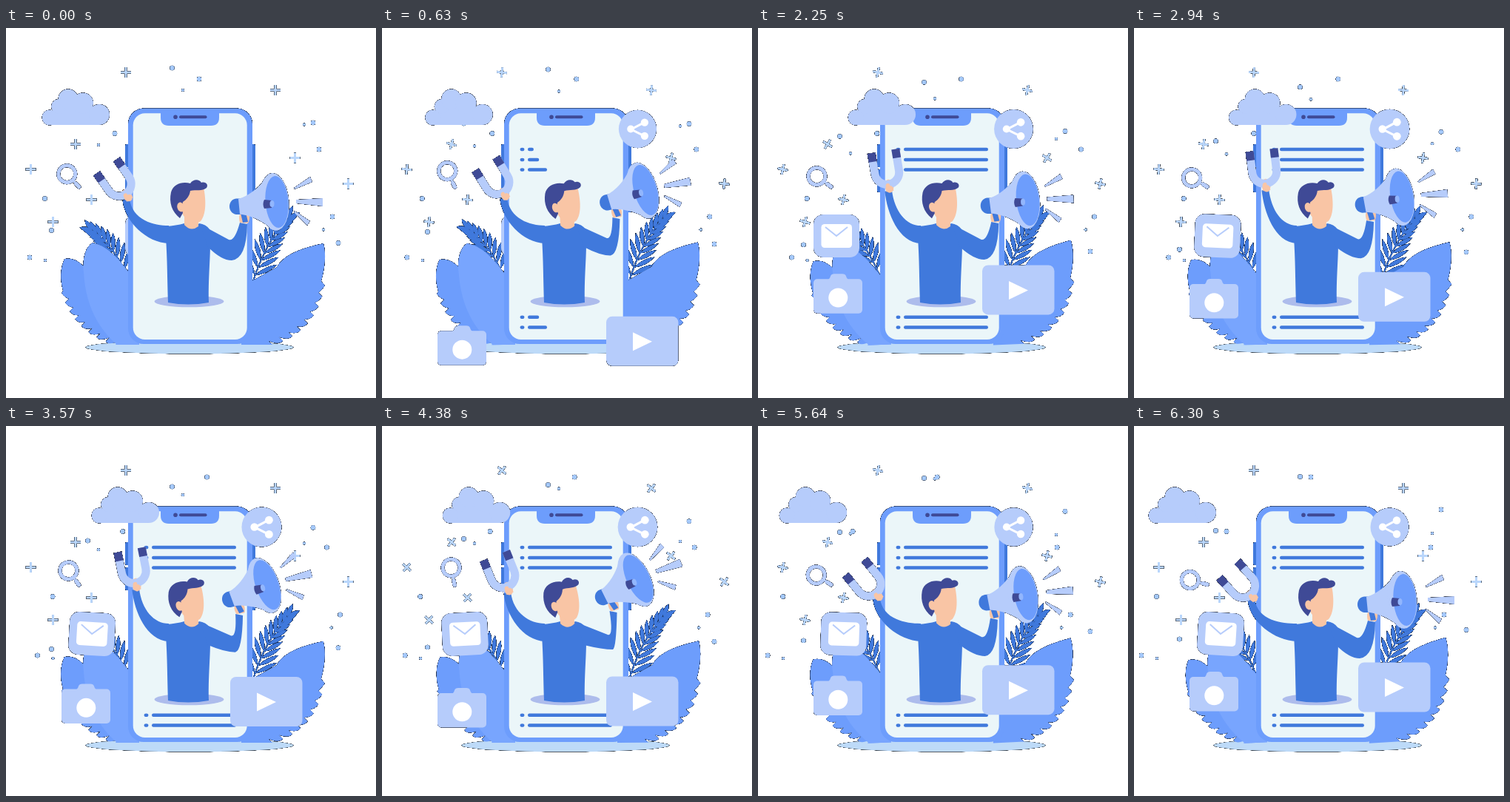
Write an HTML page that moves like this. It is 500 px wide and 500 px high and loops after 6330 ms.

```html
<!DOCTYPE html>
<html lang="en">
<head>
<meta charset="utf-8">
<title>Mobile marketing</title>
<style>
html, body { margin: 0; width: 100%; height: 100%; overflow: hidden; background: #fff; }
svg { display: block; width: 100vw; height: 100vh; }
.light { fill: #b6ccfb; }
.mid { fill: #6d9dfc; }
.soft { fill: #78a5fe; }
.blue { fill: #4079dc; }
.navy { fill: #3f4a96; }
.skin { fill: #f9c5a5; }
.white { fill: #fff; }
.spark { fill: #a4c8fa; }
.line { fill: none; stroke: #b6ccfb; }
.plus { fill: none; stroke: #b9d6fb; stroke-width: 3; }
</style>
</head>
<body>
<svg viewBox="0 0 500 500">
  <!-- Thin dark rim where soft edges meet the empty background -->
  <filter id="rim" filterUnits="userSpaceOnUse" x="0" y="0" width="500" height="500" color-interpolation-filters="sRGB">
    <feComponentTransfer in="SourceAlpha" result="solid"><feFuncA type="linear" slope="8" intercept="-1.2"/></feComponentTransfer>
    <feMerge><feMergeNode in="solid"/><feMergeNode in="SourceGraphic"/></feMerge>
  </filter>
  <g filter="url(#rim)">
    <ellipse cx="248" cy="431.5" rx="140.5" ry="8.8" fill="#bddaf8"/>
    <g id="fernL" class="blue"></g>
    <g id="fernR" class="blue"></g>
    <g id="leafL">
      <path id="edgeL" class="mid"/>
      <path class="soft" d="M180 428V350C158 318 142 296 117 290C107 296 103 312 105 330C107 365 118 400 150 428Z"/>
    </g>
    <g id="leafR"><path id="edgeR" class="mid"/></g>
    <g id="dots" class="spark"></g>
    <g id="pluses"></g>
    <g id="lens">
      <circle class="line" cy="-23" r="11.5" stroke-width="5"/>
      <path class="line" d="M0 -10V-5" stroke-width="3"/>
      <path class="line" d="M0 -5V1" stroke-width="5.5" stroke-linecap="round"/>
    </g>
    <g id="camera">
      <rect class="light" x="75" y="339" width="66" height="46.5" rx="5"/>
      <path class="light" d="M93 341Q97 339 98 335Q99 332 103 332H114Q118 332 119 335Q120 339 124 341Z"/>
      <circle class="white" cx="108.3" cy="364.3" r="13"/>
    </g>
    <g id="mail">
      <rect class="light" x="-31" y="-29" width="62" height="58" rx="13"/>
      <rect class="white" x="-20.5" y="-16" width="41.5" height="32" rx="4.5"/>
      <path class="line" d="M-15 -12L0 0L15 -12" stroke-width="2"/>
    </g>

    <rect class="blue" x="161" y="157" width="6" height="31" rx="2"/>
    <rect class="blue" x="161" y="191" width="6" height="31" rx="2"/>
    <rect class="blue" x="330" y="157" width="7" height="92" rx="2"/>
    <rect class="mid" x="165" y="108.6" width="168" height="318.4" rx="21"/>
    <rect x="171.7" y="115.3" width="154" height="305.7" rx="16" fill="#ebf6f9"/>
    <path class="mid" d="M209 110H288V121Q288 132 277 132H220Q209 132 209 121Z"/>
    <circle class="navy" cx="229" cy="120.3" r="2.8"/>
    <rect class="navy" x="234" y="118.3" width="37.5" height="4" rx="2"/>
    <g id="lines" class="blue"></g>

    <ellipse cx="247.5" cy="369.5" rx="47" ry="7.8" fill="#adbcec"/>
    <path class="blue" d="M216 268Q230 267 241 264Q251 276 261 264Q270 265 275 272C278 300 273 330 274 371Q246 376 219 371C218 345 218 310 216 284Z"/>
    <path id="armL" class="blue"/>
    <path id="armR" class="blue"/>
    <g id="head">
      <path class="skin" d="M241 248V266Q250 276 260 268V250Z"/>
      <path class="skin" d="M238 233C246 230 248 222 249 217Q261 221 267 215C271 235 270 253 263 261C255 267 242 260 238 250Z"/>
      <path class="navy" d="M235 257C224 248 220 236 223 222C226 211 238 207 249 210C253 204 261 204 264 209C270 207 274 212 271 216C265 221 257 218 249 220C248 227 244 232 239 235L237 243L239 250Z"/>
      <ellipse class="skin" cx="236" cy="242" rx="4.6" ry="6.5" transform="rotate(-15 236 242)"/>
    </g>
    <g id="magnet">
      <ellipse class="skin" cx="0" cy="-3" rx="6" ry="9"/>
      <path class="line" d="M-16.5 -51V-22A16.5 16.5 0 0 0 16.5 -22V-51" stroke-width="11"/>
      <path class="navy" d="M-22 -51H-11V-39H-22ZM11 -51H22V-39H11Z"/>
      <path class="skin" d="M-5 4Q-6 -7 -2 -7T1 -3Q5 -4 5 4Z"/>
    </g>
    <g id="horn">
      <path class="skin" d="M316 263C314 256 315 250 320 249L328 250C330 255 329 260 327 264Z"/>
      <path class="blue" d="M317 250L324 249L327 262L320 263Z"/>
      <path class="blue" d="M317 230.500H311C299 232 299 250 311 252H317Z"/>
      <path class="light" d="M314 231Q334 225 350 204L361 273Q338 254 316 251.500Z"/>
      <ellipse class="light" cx="362.500" cy="235" rx="20" ry="39" transform="rotate(-4.500 362 235)"/>
      <ellipse class="mid" cx="366" cy="235" rx="15.500" ry="35" transform="rotate(-4.500 366 235)"/>
      <path class="navy" d="M349 232L359 233V243L349 244Q346 238 349 232Z"/>
      <ellipse cx="359.500" cy="237.500" rx="3" ry="4.600" fill="#92b6fd"/>
      <g id="rays" class="light">
        <path d="M389 216L411 201L414 208L390 218Z"/>
        <path d="M392 232L428 230V241L392 237Z"/>
        <path d="M390 247L411 261L407 267L389 249Z"/>
      </g>
    </g>

    <g id="cloud" class="light">
      <path d="M59 115H126V131H59ZM70 100H116V131H70Z"/>
      <circle cx="59" cy="121" r="10.500"/><circle cx="71" cy="106" r="10"/>
      <circle cx="84" cy="96" r="13.500"/><circle cx="104" cy="101.500" r="14"/>
      <circle cx="126" cy="117" r="14"/>
    </g>
    <g id="share">
      <circle class="light" r="26"/>
      <path d="M9 -9L-9 0.500L9 9.500" fill="none" stroke="#fff" stroke-width="3"/>
      <g class="white"><circle cx="-9.500" r="5"/><circle cx="9.500" cy="-9" r="5.200"/><circle cx="9.500" cy="9.500" r="5.200"/></g>
    </g>
    <g id="video">
      <rect class="light" x="303" y="319.500" width="97.500" height="67" rx="8"/>
      <path class="white" d="M339 341V366L365 353.500Z"/>
    </g>
  </g>
</svg>
<script>
const LOOP = 6330, STEP = 30, END = 6300;
const $ = id => document.getElementById(id);

function add(parent, tag, attrs) {
  const el = document.createElementNS('http://www.w3.org/2000/svg', tag);
  for (const k in attrs) el.setAttribute(k, attrs[k]);
  return parent.appendChild(el);
}
const place = (el, value) => el.setAttribute('transform', value);
const part = (t, start, length) => Math.min(1, Math.max(0, (t - start) / length));
const easeOut = p => 1 - (1 - p) ** 3;
const easeInOut = p => p < .5 ? 4 * p ** 3 : 1 - 4 * (1 - p) ** 3;

// Sine-eased moves between turning points [time, value]
function tween(t, ...keys) {
  let value = keys[0][1];
  for (let i = 1; i < keys.length; i++) {
    const [t0, a] = keys[i - 1], [t1, b] = keys[i];
    value += (b - a) * (1 - Math.cos(Math.PI * part(t, t0, t1 - t0))) / 2;
  }
  return value;
}
// The slow swing shared by cloud, magnet and dots
const swing = (t, start, peak, end) => tween(t, [0, start], [2780, peak], [END, end]);

// Each group of dots drifts its own way
const sideways = t => [swing(t, 0, 15, -22), 0];
const upDown = t => [0, swing(t, 0, 12.5, -15)];
const dip = t => [0, tween(t, [0, 0], [3600, 28], [END, 14.5])];
const BIG = 3.2, SMALL = 2.1;
const dots = [
  [sideways, BIG, [261, 69], [423, 164], [441, 255], [147, 142.5], [52.5, 230.5], [32, 310]],
  [sideways, SMALL, [429, 272.5], [53, 314]],
  [upDown, BIG, [415, 128], [449, 290.5]],
  [upDown, SMALL, [239, 84], [125, 158]],
  [dip, BIG, [224.5, 54], [110.5, 127], [61.5, 273.5]],
  [dip, SMALL, [403, 130.5]]
].map(([move, r, ...points]) => {
  const el = add($('dots'), 'g');
  for (const [cx, cy] of points) add(el, 'circle', { cx, cy, r });
  return { el, move };
});

// Pluses: x, y, size of the first turn
const pluses = [
  [162, 60, 17], [364, 84, 17], [94, 157, 45], [33.5, 191, 17],
  [390.5, 175.5, 45], [462.5, 210.5, 17], [115.5, 232, 17], [63.5, 262, 22]
].map(([x, y, turn]) => ({ x, y, turn, el: add($('pluses'), 'path', { class: 'plus', d: 'M-7 0H7M0 -7V7' }) }));

// Text lines grow one after another
const lines = [191.5, 178, 164, 404.5, 390.7].map((y, i) => ({
  y, delay: 110 + 85 * (i % 3),
  bullet: add($('lines'), 'ellipse', { rx: 2.9, ry: 2.3 }),
  bar: add($('lines'), 'rect', { x: 197, y: y - 2.2, height: 4.4, rx: 2.2 })
}));

const along = (u, a, b, c) => (1 - u) ** 2 * a + 2 * u * (1 - u) * b + u * u * c;

// Saw-toothed edge along a curve; inward is the x side of the leaf body
function teeth([x0, y0], [cx, cy], [x1, y1], inward, count) {
  let d = '';
  for (let i = 0; i < count; i++) {
    const x = along(i / count, x0, cx, x1), y = along(i / count, y0, cy, y1);
    const nx = along((i + 1) / count, x0, cx, x1), ny = along((i + 1) / count, y0, cy, y1);
    d += `L${x} ${y}Q${x + 4 * inward} ${y + 6} ${nx + 5 * inward} ${ny - 5}`;
  }
  return d + `L${x1} ${y1}`;
}
$('edgeL').setAttribute('d', 'M180 428V345L104 321C97 314 88 310 79 312C73 325 73 340 77 355'
  + teeth([75, 358], [92, 412], [148, 428], 1, 8) + 'Z');
$('edgeR').setAttribute('d', 'M318 428V350L366 323C376 305 402 297 429 291C433 305 431 325 426 342'
  + teeth([431, 348], [420, 410], [360, 428], -1, 8) + 'Z');

// Fern with leaflets along a curved stem
function fern(g, [x0, y0], [cx, cy], [x1, y1], count, size) {
  add(g, 'path', { d: `M${x0} ${y0}Q${cx} ${cy} ${x1} ${y1}`, fill: 'none', stroke: '#4079dc', 'stroke-width': 1.8 });
  for (let i = 0; i <= count; i++) {
    const u = i / count;
    const angle = Math.atan2((1 - u) * (cy - y0) + u * (y1 - cy), (1 - u) * (cx - x0) + u * (x1 - cx)) * 180 / Math.PI;
    const l = size * (1 - .45 * u);
    for (const side of [-1, 1])
      add(g, 'path', {
        d: `M0 0Q${l * .5} -6 ${l} 0Q${l * .5} 6 0 0`,
        transform: `translate(${along(u, x0, cx, x1)} ${along(u, y0, cy, y1)}) rotate(${angle + side * (48 - 28 * u)})`
      });
  }
}
fern($('fernL'), [168, 345], [148, 295], [117, 274], 10, 33);
fern($('fernR'), [333, 345], [350, 290], [380, 258], 10, 35);

function draw(t) {
  for (const { el, move } of dots) place(el, `translate(${move(t)})`);
  for (const p of pluses) {
    const angle = tween(t, [0, 0], [1600, p.turn], [3500, 0], [4500, 42], [END, 0]);
    place(p.el, `translate(${p.x} ${p.y}) rotate(${angle})`);
  }
  for (const l of lines) {
    place(l.bullet, `translate(189.500 ${l.y}) scale(${easeOut(part(t, l.delay - 110, 400))})`);
    l.bar.setAttribute('width', 114 * easeInOut(part(t, l.delay, 1350)));
  }

  place($('cloud'), `translate(${swing(t, 0, 80, -29)} 0)`);
  place($('lens'), `translate(98 214) rotate(${tween(t, [0, -43], [1200, -10], [2650, -63], [4450, -11], [END, -75])})`);

  const sway = tween(t, [0, 0], [1700, -3], [3800, 0], [END, -3.2]);
  place($('leafL'), `rotate(${sway * .85} 165 430)`);
  place($('leafR'), `rotate(${sway} 330 430)`);
  place($('fernL'), `rotate(${-sway} 168 345)`);
  place($('fernR'), `rotate(${sway * .4} 333 345)`);

  // Icons enter, then float
  const rise = 100 * (1 - easeInOut(part(t, 0, 1500)));
  const pop = easeOut(part(t, 0, 450));
  const grow = (cx, cy, dy) => `translate(${cx} ${cy + dy + rise}) scale(${pop}) translate(${-cx} ${-cy})`;
  place($('camera'), grow(108, 359, tween(t, [2100, 0], [4300, 22], [END, 0])));
  place($('video'), grow(352, 353, tween(t, [2000, 0], [3900, 21], [END, 0])));
  place($('share'), `translate(345.500 136.500) scale(${easeOut(part(t, 100, 700)) * tween(t, [1230, 1], [3570, 1.04], [END, 1])})`);
  const slide = 86 * (1 - easeInOut(part(t, 600, 1600)));
  const mailX = tween(t, [2250, 106], [3400, 116.5], [4300, 112], [END, 117]);
  const tilt = tween(t, [2250, 0], [3400, 4], [4300, -3], [END, 3.5]);
  place($('mail'), `translate(${mailX + slide} 281) rotate(${tilt})`);

  // Magnet and the arm that holds it
  const turn = swing(t, -35, -7, -42);
  const mx = 179 + .49 * (turn + 7), my = 215.5 - .47 * (turn + 7);
  place($('magnet'), `translate(${mx} ${my}) rotate(${turn})`);
  const ax = mx - 1 + turn * .05, ay = my + 3;
  $('armL').setAttribute('d', `M220 267C200 267 ${ax + 8} ${ay + 28} ${ax + 4.5} ${ay - 1}L${ax - 5} ${ay + 1}C${ax - 2} ${ay + 30} 190 290 220 291Z`);

  // Megaphone, its arm and the head move together
  const lift = tween(t, [0, 0], [1200, 1], [2400, .05], [4300, 1], [END, 0]);
  place($('horn'), `translate(${-9 * lift} ${-14 * lift}) rotate(${-21 * lift} 321 257)`);
  place($('rays'), `translate(${5 * part(t, 5100, 1200)} 0)`);
  place($('head'), `rotate(${-6.5 * lift} 252 265)`);
  const wx = 321 - 8.5 * lift, wy = 263 - 13 * lift;
  const ix = 301 + 4 * lift, iy = 286 - 4 * lift;
  const bx = 305 + 7 * lift, by = 314 - 12 * lift;
  $('armR').setAttribute('d', `M262 265L${ix} ${iy}Q${ix + 8} ${iy + 3} ${wx - 5} ${wy}L${wx + 5} ${wy + 2}Q${wx + 4} ${by - 2} ${bx} ${by}Q${bx - 14} ${by} 273 296Z`);
}

function tick() {
  const t = performance.now() % LOOP;
  draw(Math.floor(t / STEP) * STEP);
  requestAnimationFrame(tick);
}
tick();
</script>
</body>
</html>
```
